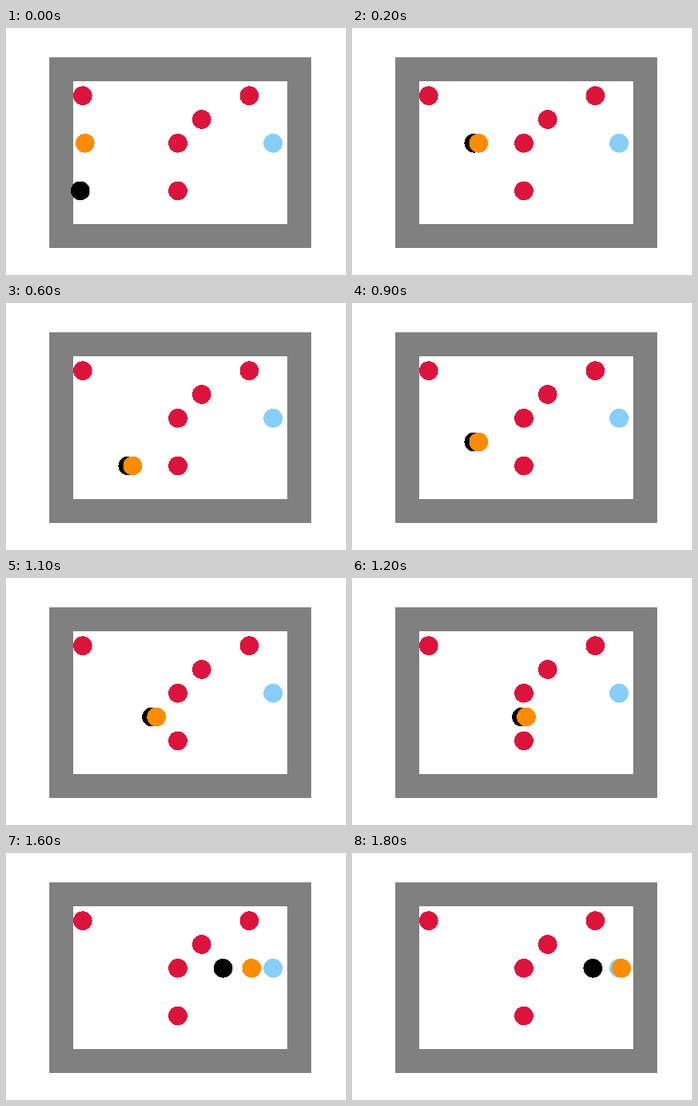
An HTML page without scripts that plays this animation: 440 by 320 pixels, repeating every 1900 ms.

```html
<!DOCTYPE html>
<html lang="en">
<head>
<meta charset="utf-8">
<title>Grid walk</title>
<style>
  @property --col { syntax: "<number>"; inherits: true; initial-value: 0; }
  @property --row { syntax: "<number>"; inherits: true; initial-value: 0; }
  @property --lead { syntax: "<number>"; inherits: true; initial-value: 0; }
  @property --lag { syntax: "<number>"; inherits: true; initial-value: 0; }

  html, body { margin: 0; width: 100%; height: 100%; overflow: hidden; background: #fff; }
  svg { display: block; width: 440px; height: 320px; shape-rendering: crispEdges; }
  .wall { fill: #808080; }

  /* a circle sits at its grid cell; --shift is its place across the cell */
  circle {
    --cell: 30.8px;
    --shift: .4;
    r: calc(.4 * var(--cell));
    cx: calc(56.1px + (var(--col) + var(--lead) + var(--shift)) * var(--cell));
    cy: calc(38.4px + (var(--row) + var(--lag) + .6) * var(--cell));
  }
  .trap { fill: #dc143c; }
  .goal { fill: #87cefa; }
  .chaser { fill: #000; --shift: .3; }
  .walker { fill: #ff8c00; --shift: .5; }

  /* 19 ticks of 100 ms; both walk one route */
  .pair, .chaser, .walker { animation: 1.9s steps(1) infinite; }
  .pair { animation-name: route; }
  .chaser { animation-name: catch-up; }
  .walker { animation-name: run-ahead; }

  @keyframes route {
    0% { --col: 1; --row: 3; animation-timing-function: steps(2); }
    10.52% { --col: 3; --row: 3; }
    15.78% { --col: 3; --row: 2; }
    26.31% { --col: 3; --row: 4; }
    31.57% { --col: 3; --row: 5; }
    47.36% { --col: 3; --row: 4; }
    52.63% { --col: 3; --row: 4; animation-timing-function: steps(4); }
    73.68% { --col: 7; --row: 4; }
    78.94% { --col: 7; --row: 3; }
    89.47%, 100% { --col: 8; --row: 3; }
  }
  @keyframes catch-up {
    0% { --lag: 2; animation-timing-function: steps(2); }
    10.52%, 100% { --lag: 0; }
  }
  @keyframes run-ahead {
    0%, 89.47% { --lead: 0; }
    84.21%, 94.73%, 100% { --lead: 1; }
  }
</style>
</head>
<body>
<svg viewBox="0 0 440 320">
  <path class="wall" fill-rule="evenodd" d="M56 38H395V285H56ZM87 69V254H364V69Z"/>
  <circle class="trap" style="--col: 1; --row: 1"/>
  <circle class="trap" style="--col: 8; --row: 1"/>
  <circle class="trap" style="--col: 6; --row: 2"/>
  <circle class="trap" style="--col: 5; --row: 3"/>
  <circle class="trap" style="--col: 5; --row: 5"/>
  <circle class="goal" style="--col: 9; --row: 3"/>
  <g class="pair">
    <circle class="chaser"/>
    <circle class="walker"/>
  </g>
</svg>
</body>
</html>
```
